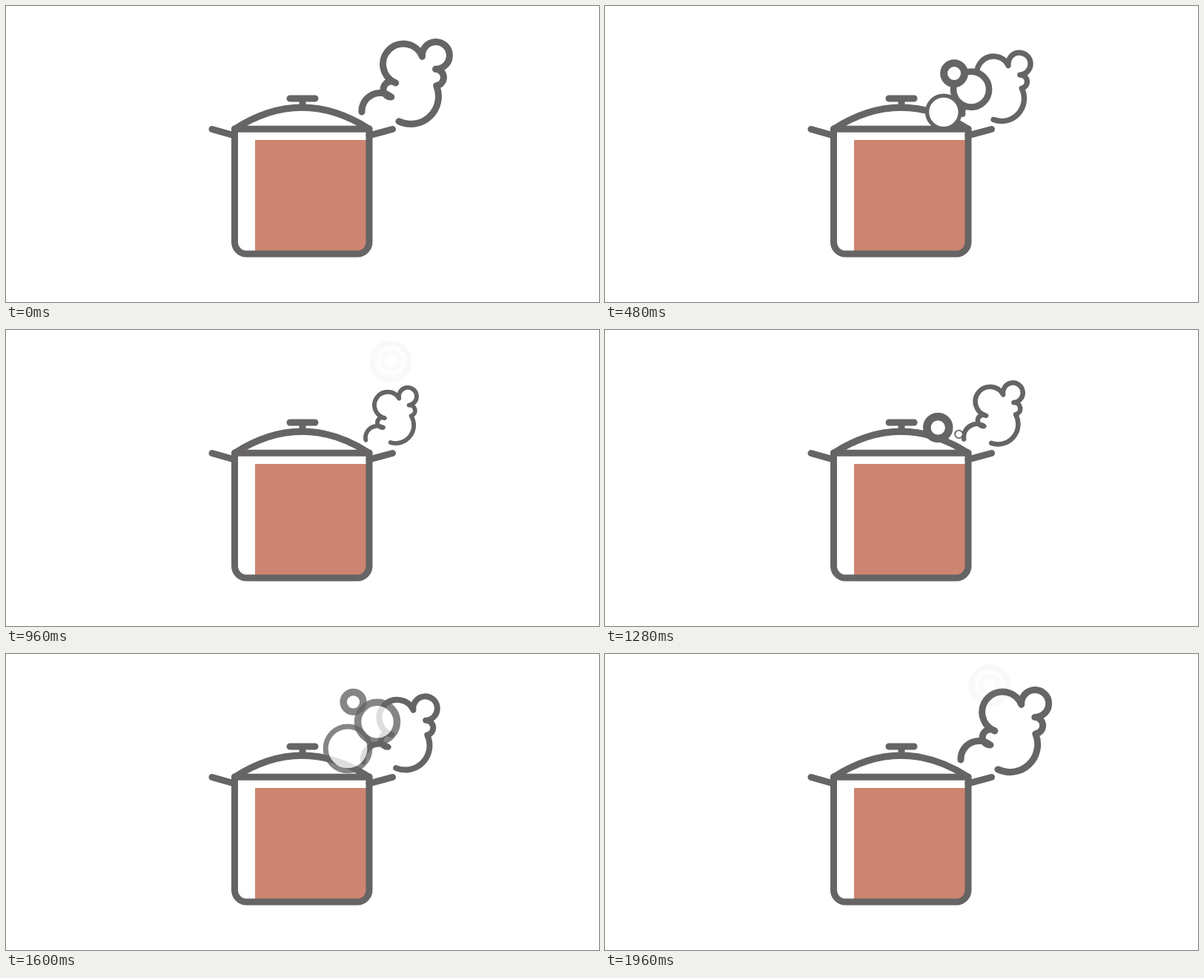
Write an HTML page that moves like this. It is 800 px wide and 400 px high and loops after 2 s.

```html
<!DOCTYPE html>
<html lang="en">
<head>
<meta charset="utf-8">
<title>Cooking pot</title>
<style>
  html, body { margin: 0; width: 100%; height: 100%; overflow: hidden; background: #fff; }
  svg { display: block; width: 100vw; height: 100vh; }
  .line { fill: none; stroke: #666464; stroke-width: 9; stroke-linecap: round; stroke-linejoin: round; }
  .bubble { fill: #fff; stroke: #666464; }
</style>
</head>
<body>
<svg viewBox="0 0 800 400">
  <path fill="#cd8571" d="M336 181H488V333H336z"/>
  <g class="line">
    <path d="M308.5 166V319a16 16 0 0 0 16 16H474a16 16 0 0 0 16-16V166"/>
    <path d="M308.5 166.2Q399.5 108 490 166.2z"/>
    <path d="M383 125H417M400 125V137M278 166.5L308 175M521.5 166.5L490 175"/>
    <path id="cloud" d="M480 143A24.5 24.5 0 0 1 520 123A10.5 10.5 0 1 1 526 104
      A27.5 27.5 0 1 1 562 68.5A18.5 18.5 0 1 1 580 85.5
      A11.3 11.3 0 0 1 581 108A37.5 37.5 0 0 1 530 156"/>
  </g>
  <g id="steam"></g>
</svg>
<script>
const LOOP = 2000, PUFF = 1000;
const END = [1, 520, 41];

// Key places along each rise, [share of the puff, x, y]; all bubbles meet at END.
// A bubble is born at its first key and has its size at `full`.
const bubbles = [
  { size: 36.5, ratio: .235, full: .56, path: [[.4, 456, 148], [.6, 461, 128], [.64, 467.5, 117], END] },
  { size: 32.3, ratio: .36, full: .6, path: [[.24, 474, 141], [.32, 482, 138], [.6, 501, 92], [.64, 496, 83], END] },
  { size: 16.3, ratio: .71, full: .27, path: [[.16, 446, 140], [.28, 449, 132], [.32, 473, 127], [.6, 468.5, 65], [.64, 481, 61], END] }
];

const clamp = v => Math.max(0, Math.min(1, v));
const easeOut = v => Math.sin(clamp(v) * Math.PI / 2);

// Smooth curve through the keys, at rest at both ends.
function along(keys, t) {
  const last = keys.length - 1;
  let i = 0;
  while (i < last - 1 && t > keys[i + 1][0]) i++;
  const a = keys[i], b = keys[i + 1], span = b[0] - a[0], u = (t - a[0]) / span;
  const slope = (k, c) => k === 0 || k === last ? 0 :
    (keys[k + 1][c] - keys[k - 1][c]) / (keys[k + 1][0] - keys[k - 1][0]) * span;
  return [1, 2].map(c => {
    const d = b[c] - a[c], m = slope(i, c), n = slope(i + 1, c);
    return a[c] + u * (m + u * (3 * d - 2 * m - n + u * (m + n - 2 * d)));
  });
}

const cloud = document.getElementById("cloud");
const steam = document.getElementById("steam");
for (const b of bubbles) {
  b.el = document.createElementNS("http://www.w3.org/2000/svg", "circle");
  b.el.setAttribute("class", "bubble");
  steam.append(b.el);
}

function set(el, attrs) {
  for (const name in attrs) el.setAttribute(name, attrs[name]);
}

function draw(now) {
  const t = now % LOOP, p = t % PUFF / PUFF;

  // The cloud tilts evenly and shrinks with easing, then returns.
  const tilt = clamp(1 - Math.abs(t - 975) / 1000);
  const scale = 1 - .35 * easeOut(tilt ** 1.5);
  set(cloud, { transform: `translate(498 154) rotate(${-9.2 * tilt}) scale(${scale}) translate(-498 -154)` });

  const fade = clamp((.968 - p) / .468);
  for (const { el, size, ratio, full, path } of bubbles) {
    const birth = path[0][0], age = Math.max(p, birth);
    const [cx, cy] = along(path, age);
    const r = size * (1 - .3 * age) * easeOut((age - birth) / (full - birth));
    set(el, { cx, cy, r, "stroke-width": r * ratio, opacity: p > birth ? fade : 0 });
  }
}

const start = performance.now();
function frame() {
  draw(performance.now() - start);
  requestAnimationFrame(frame);
}
frame();
</script>
</body>
</html>
```
